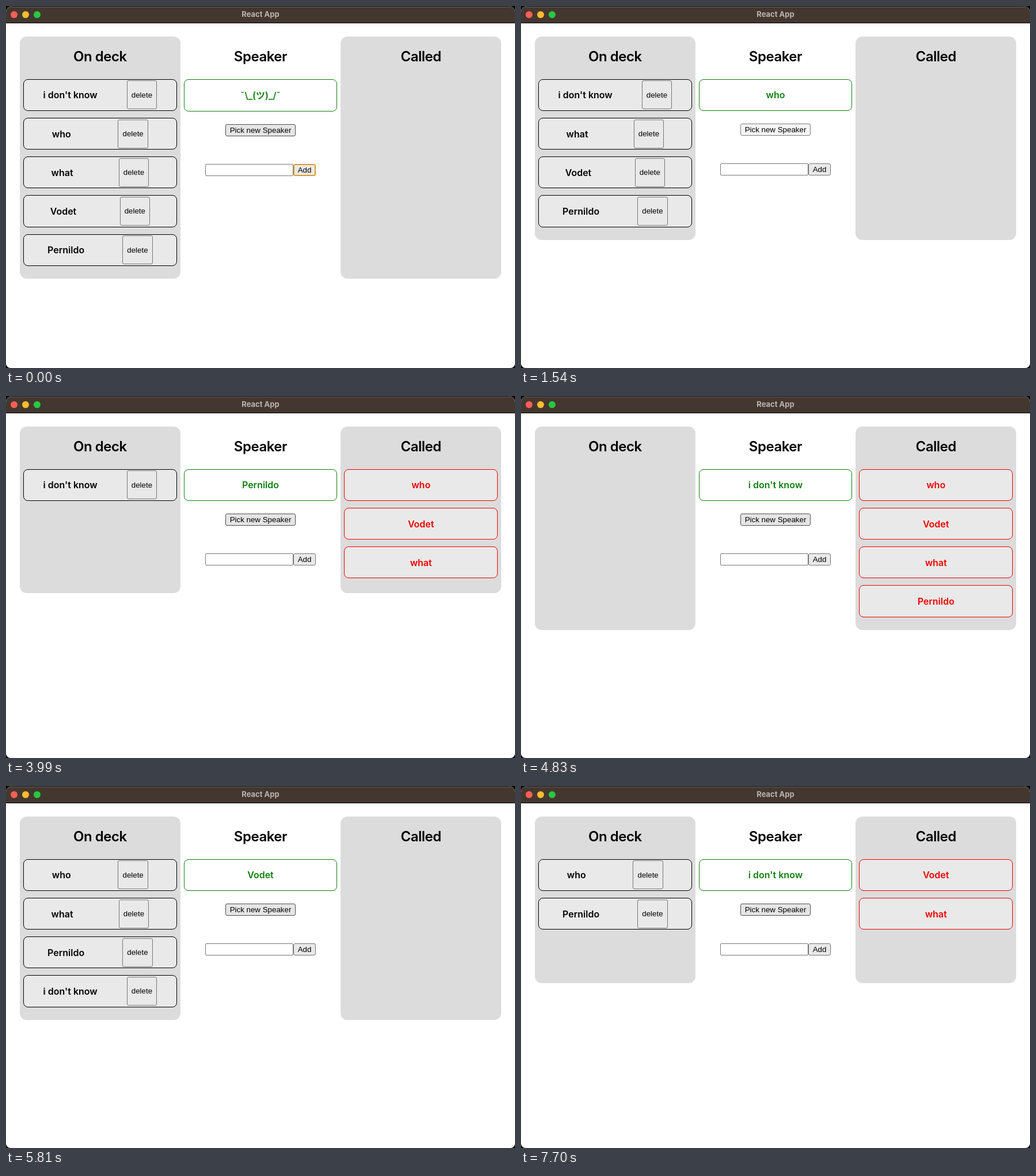
Recreate the animation shown at these times as an HTML page. Size 884x628 px, loop 8 s.

```html
<!DOCTYPE html>
<html lang="en">
<head>
<meta charset="utf-8">
<title>React App</title>
<style>
  * { box-sizing: border-box; }
  html, body { margin: 0; width: 100%; height: 100%; overflow: hidden; background: #000; }
  #window {
    position: relative; width: 884px; height: 628px; overflow: hidden;
    background: #fff; border-radius: 10px 10px 8px 8px;
    font: 600 16px/1 Inter, "Noto Sans CJK JP", "Noto Sans CJK", sans-serif;
  }
  #bar {
    position: absolute; inset: 0 0 auto; height: 30px; background: #43372f;
    border: solid #000; border-width: 1px 0; border-radius: 10px 10px 0 0;
    box-shadow: inset 0 1px #766c66;
    color: #bbb5b0; font-size: 13px; font-weight: 700; line-height: 27px; text-align: center;
  }
  #bar i { position: absolute; top: 8px; width: 12px; height: 12px; border-radius: 50%; }
  .column { position: absolute; top: 53px; width: 278.67px; border-radius: 12px; }
  .side { background: #dcdcdc; }
  h2 {
    position: absolute; top: 21px; width: 100%; margin: 0;
    font: inherit; font-size: 24px; line-height: 28px; letter-spacing: -.02em; text-align: center;
  }
  .row {
    position: absolute; left: 6px; width: 266.67px; height: 55.2px; padding: 0 8px;
    display: flex; justify-content: space-around; align-items: center;
    border: 1px solid; border-radius: 8px; background: #e9e9e9; white-space: nowrap;
  }
  .speaker { color: #0f7d0f; background: #fff; }
  .called { color: #f00000; }
  button, .input { border: 1px solid #767676; height: 21px; }
  button {
    padding: 0 7px; border-radius: 3px; background: #e9e9e9; color: #000;
    font: 13.333px/1 "Liberation Sans", Arial, sans-serif; white-space: nowrap;
  }
  .row button { height: 50px; }
  .controls { position: absolute; width: 100%; display: flex; justify-content: center; }
  .input { width: 153px; background: #fff; border-radius: 2px; }
  .hover { background: #e5e5e5; border-color: #4f4f4f; }
  .pressed { background: #f4f4f4; border-color: #7e7e7e; }
  .focused { border-color: #dc9a2c; box-shadow: inset 0 0 0 1px #dc9a2c; }
</style>
</head>
<body>
<div id="window">
  <div id="bar">
    <i style="left:8px;background:#ff5f57"></i>
    <i style="left:28px;background:#febc2e"></i>
    <i style="left:48px;background:#28c840"></i>
    React App
  </div>
  <main id="app"></main>
</div>
<script>
const LOOP = 8000;
const START = ["i don't know", "who", "what", "Vodet", "Pernildo"];

// Clicks: press time, hold time, speaker picked (none = start over).
const CLICKS = [
  [280, 70, "who"], [1540, 70, "Vodet"], [2660, 70, "what"],
  [3500, 140, "Pernildo"], [4410, 140, "i don't know"], [5110, 70],
  [5740, 70, "Vodet"], [6440, 70, "what"], [7560, 140, "i don't know"],
];

function stateAt(time) {
  let state = { deck: START, speaker: "", called: [], pressed: false, focused: time < CLICKS[0][0] };
  for (const [press, hold, pick] of CLICKS) {
    if (time < press) break;
    state.pressed = time < press + hold;
    if (state.pressed) break;
    const called = state.speaker ? [...state.called, state.speaker] : state.called;
    state = pick
      ? { ...state, deck: state.deck.filter(name => name !== pick), speaker: pick, called }
      : { ...state, deck: called, speaker: "", called: [] };
  }
  return state;
}

const row = (name, index, kind = "", extra = "", grow = 0) =>
  `<div class="row ${kind}" style="top:${73.8 + 67.2 * index}px;height:${55.2 + grow}px"><span>${name}</span>${extra}</div>`;

const column = (x, kind, title, height, content) =>
  `<section class="column ${kind}" style="left:${x}px;height:${height}px"><h2>${title}</h2>${content}</section>`;

function render({ deck, speaker, called, pressed, focused }) {
  const height = Math.max(289, 84 + 67.2 * Math.max(deck.length, called.length));
  const shift = speaker ? 0 : 1;
  const middle = row(speaker || "¯\\_(ツ)_/¯", 0, "speaker", "", shift) +
    `<div class="controls" style="top:${151 + shift}px">
       <button class="${pressed ? "pressed" : "hover"}">Pick new Speaker</button>
     </div>
     <div class="controls" style="top:${220 + shift}px">
       <div class="input"></div><button class="${focused ? "focused" : ""}">Add</button>
     </div>`;
  document.getElementById("app").innerHTML =
    column(24, "side", "On deck", height,
      deck.map((name, i) => row(name, i, "", "<button>delete</button>")).join("")) +
    column(302.67, "", "Speaker", height, middle) +
    column(581.33, "side", "Called", height,
      called.map((name, i) => row(name, i, "called")).join(""));
}

let shown = "";
function tick() {
  const state = stateAt(performance.now() % LOOP);
  const key = JSON.stringify(state);
  if (key !== shown) render(state);
  shown = key;
  requestAnimationFrame(tick);
}
tick();
</script>
</body>
</html>
```
